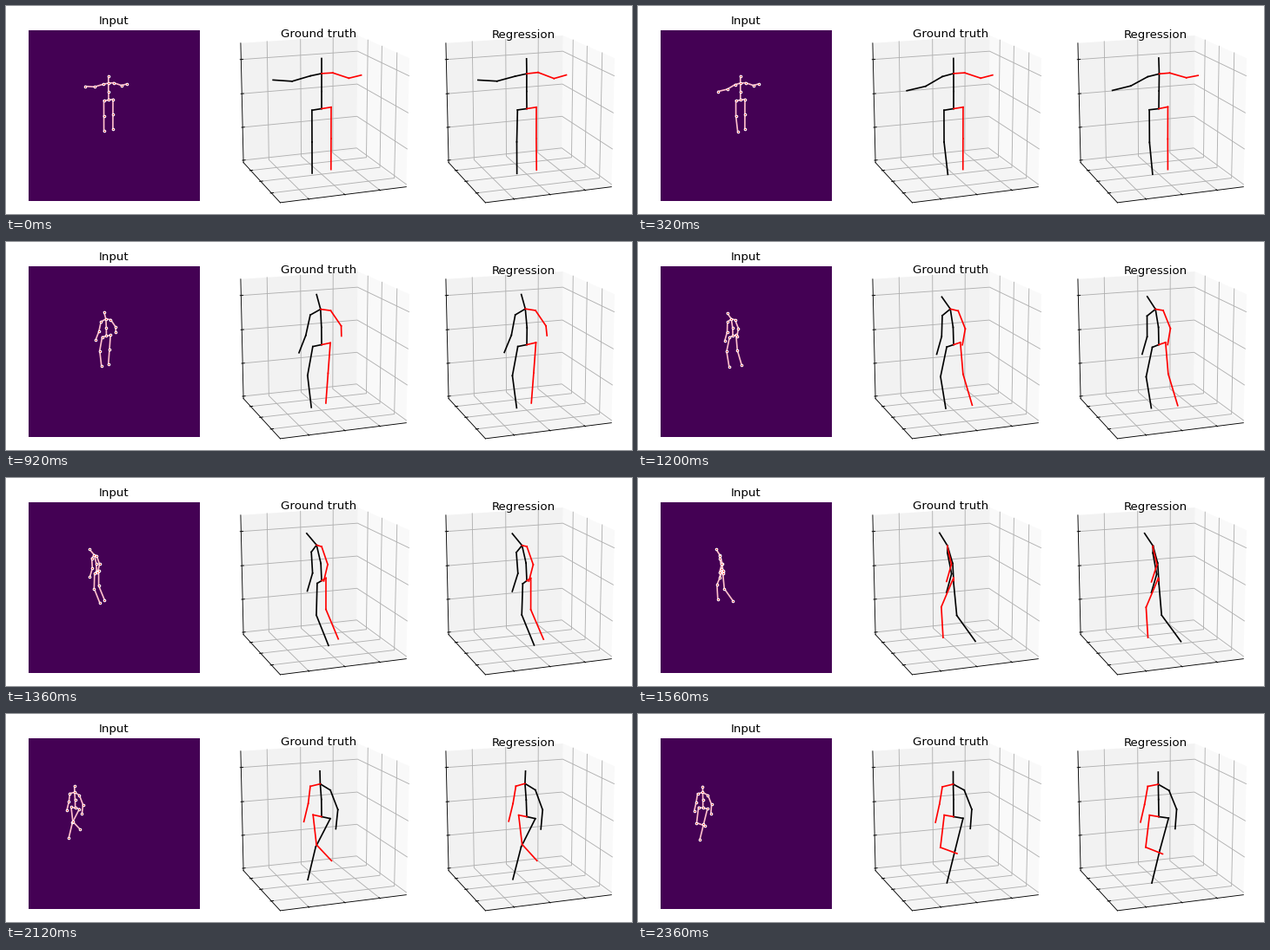
Animation, 720 px wide and 240 px high, one loop 2400 ms. Source, as a matplotlib script:

```python
import math

import matplotlib.pyplot as plt
import numpy as np
from matplotlib.animation import FuncAnimation

FRAMES, STEP = 60, 40
PANEL_GAP = 236
ELEV, AZIM, DIST = math.radians(15), math.radians(70), 7.5
ROOT = np.array([362.5, 118.0])
UNIT = 142  # body lengths are in stage pixels, the box has side 1

PARENT = [None, 0, 1, 2, 2, 4, 5, 2, 7, 8, 0, 10, 11, 0, 13, 14]
RED = {7, 8, 9, 13, 14, 15}

# Left limbs are black, right limbs red; angles in degrees, times in ms.
LEFT, RIGHT = -1, 1
ARMS = {
    LEFT: dict(upper=82, fore=98, start=0, end=1150, curl=0),
    RIGHT: dict(upper=68, fore=90, start=300, end=1300, curl=25),
}
LEGS = {
    LEFT: dict(mean=18, swing=24, period=1200, peak=2120, bend=100, kick=1880),
    RIGHT: dict(mean=9, swing=18, period=900, peak=1660, bend=950, kick=2360),
}


def ease(t, start, end):
    u = min(max((t - start) / (end - start), 0), 1)
    return u * u * (3 - 2 * u)


def bump(t, centre, width):
    return math.exp(-((t - centre) / width) ** 2)


def bone(length, pitch, spread=0):
    """Hanging bone as (right, forward, up), tilted forward and sideways."""
    p, s = math.radians(pitch), math.radians(spread)
    return length * np.array([math.sin(s) * math.cos(p), math.sin(p),
                              -math.cos(s) * math.cos(p)])


def arm(t, side, neck):
    a = ARMS[side]
    raised = 1 - ease(t, a["start"], a["end"])
    shoulder = neck + (side * 15, 0, 4 * raised - 5)
    spread = side * (18 + (a["upper"] - 18) * raised)
    elbow = shoulder + bone(24, -11 * (1 - raised), spread)
    spread = side * (5 + (a["fore"] - 5) * raised)
    wrist = elbow + bone(22, 15 + a["curl"] * bump(t, 750, 250), spread)
    return [shoulder, elbow, wrist]


def leg(t, side):
    g = LEGS[side]
    cycle = math.cos(2 * math.pi * (t - g["peak"]) / g["period"])
    thigh = ease(t, 400, 1700) * (g["mean"] + g["swing"] * cycle)
    bend = ease(t, g["bend"], g["bend"] + 450) - ease(t, g["kick"], g["kick"] + 400)
    flex = 25 * bend + 52 * bump(t, g["kick"], 200)
    hip = np.array([side * 13, 0, 0])
    knee = hip + bone(38, thigh)
    return [hip, knee, knee + bone(38, thigh - flex)]


def body(t):
    """All joints, relative to the pelvis, as (right, forward, up)."""
    stoop = 3 * ease(t, 1400, 2400)
    lean, nod = 7 * bump(t, 1550, 550), 12.5 * bump(t, 1280, 480)
    neck = np.array([0, lean, 41.5 - stoop])
    head = neck + (0, nod, math.sqrt(17.5 ** 2 - nod ** 2) - stoop)
    spine = np.array([0, 0.15 * lean, 20.5])
    return np.array([np.zeros(3), spine, neck, head,
                     *arm(t, LEFT, neck), *arm(t, RIGHT, neck),
                     *leg(t, LEFT), *leg(t, RIGHT)])


def project(points):
    """Perspective view of points in the box centred on the origin."""
    x, y, z = np.transpose(points)
    side = y * math.cos(AZIM) - x * math.sin(AZIM)
    near = x * math.cos(AZIM) + y * math.sin(AZIM)
    depth = DIST - near * math.cos(ELEV) - z * math.sin(ELEV)
    up = z * math.cos(ELEV) - near * math.sin(ELEV)
    return np.column_stack([362.5 + 1069 * side / depth,
                            123.4 - 1065 * up / depth])


def pose_at(t):
    """Turn the walker from facing away to facing the viewer."""
    turn = 32 + 118 / (1 + math.exp((1565 - t) / 240))
    heading = AZIM + math.pi + math.radians(turn)
    c, s = math.cos(heading), math.sin(heading)
    right, forward, up = body(t).T / UNIT
    world = np.column_stack([right * s + forward * c,
                             forward * s - right * c, up + 0.0394])
    return project(world)


fig = plt.figure(figsize=(9, 3), dpi=80, facecolor="white")
ax = fig.add_axes([0, 0, 1, 1])
ax.set_xlim(-0.5, 719.5)
ax.set_ylim(239.5, -0.5)
ax.axis("off")


def title(x, y, text):
    ax.text(x, y, text, fontsize=12, family="DejaVu Sans", ha="center",
            va="baseline", zorder=8)


def draw_box(dx):
    h = 0.5 + 1 / 48
    ticks = [-0.5 / 1.7, 0, 0.5 / 1.7]
    levels = [v / 1.7 - 0.5 for v in (0, 0.5, 1, 1.5)]

    def path(points):
        return (project(points) + (dx, 0)).T

    def line(color, z, *points):
        ax.plot(*path(points), color=color, lw=0.8, zorder=z)

    panes = [
        ("#f9f9f9", [(-h, -h, -h), (-h, h, -h), (-h, h, h), (-h, -h, h)]),
        ("#f2f2f2", [(-h, -h, -h), (h, -h, -h), (h, -h, h), (-h, -h, h)]),
        ("#f5f5f5", [(-h, -h, -h), (h, -h, -h), (h, h, -h), (-h, h, -h)]),
    ]
    for color, corners in panes:
        ax.fill(*path(corners), color=color, lw=0, zorder=1)

    out, inn = h + 0.1 / 12, h - 0.2 / 12
    for v in ticks:
        line("#b0b0b0", 2, (v, h, -h), (v, -h, -h), (v, -h, h))
        line("#b0b0b0", 2, (h, v, -h), (-h, v, -h), (-h, v, h))
        line("black", 3, (v, out, -h), (v, inn, -h))
        line("black", 3, (out, v, -h), (inn, v, -h))
    for v in levels:
        line("#b0b0b0", 2, (h, -h, v), (-h, -h, v), (-h, h, v))
        line("black", 3, (out, -h, v), (inn, -h, v))
    line("black", 3, (h, -h, h), (h, -h, -h))
    line("black", 3, (h, -h, -h), (h, h, -h))
    line("black", 3, (h, h, -h), (-h, h, -h))


def skeleton(color=None):
    lines = []
    for j in range(1, 16):
        shade = color or ("red" if j in RED else "black")
        lines += ax.plot([], [], color=shade, lw=1.5, zorder=6 if j in RED else 5)
    return lines


def set_pose(lines, joints):
    for j, segment in enumerate(lines, 1):
        segment.set_data(*joints[[j, PARENT[j]]].T)


ax.add_patch(plt.Rectangle((25.5, 27.5), 197, 197, fc="#440154", lw=0, zorder=1))
title(124, 21, "Input")
for n, name in enumerate(["Ground truth", "Regression"]):
    draw_box(n * PANEL_GAP)
    title(359.5 + n * (PANEL_GAP - 0.5), 36, name)

flat, truth, guess = skeleton("pink"), skeleton(), skeleton()
dots = ax.scatter(np.zeros(16), np.zeros(16), s=5, color="red",
                  edgecolors="white", linewidths=1, zorder=10)

rng = np.random.default_rng(4)
phase = rng.uniform(0, 2 * math.pi, (15, 2))
turns = rng.integers(1, 4, (15, 2))


def update(i):
    t = i * STEP
    joints = pose_at(t)
    set_pose(truth, joints)

    # The prediction strays slightly from the true joints.
    predicted = joints + (PANEL_GAP, 0)
    predicted[1:] += 0.5 * np.sin(2 * math.pi * i / FRAMES * turns + phase)
    set_pose(guess, predicted)

    walk_x = 117.3 - 45 * ease(t, 650, 2600)
    small = (joints - ROOT) * (0.475, 0.48) + (walk_x, 108)
    set_pose(flat, small)
    dots.set_offsets(small)
    return [*flat, *truth, *guess, dots]


anim = FuncAnimation(fig, update, frames=FRAMES, interval=STEP, repeat=True)
plt.show()
```
